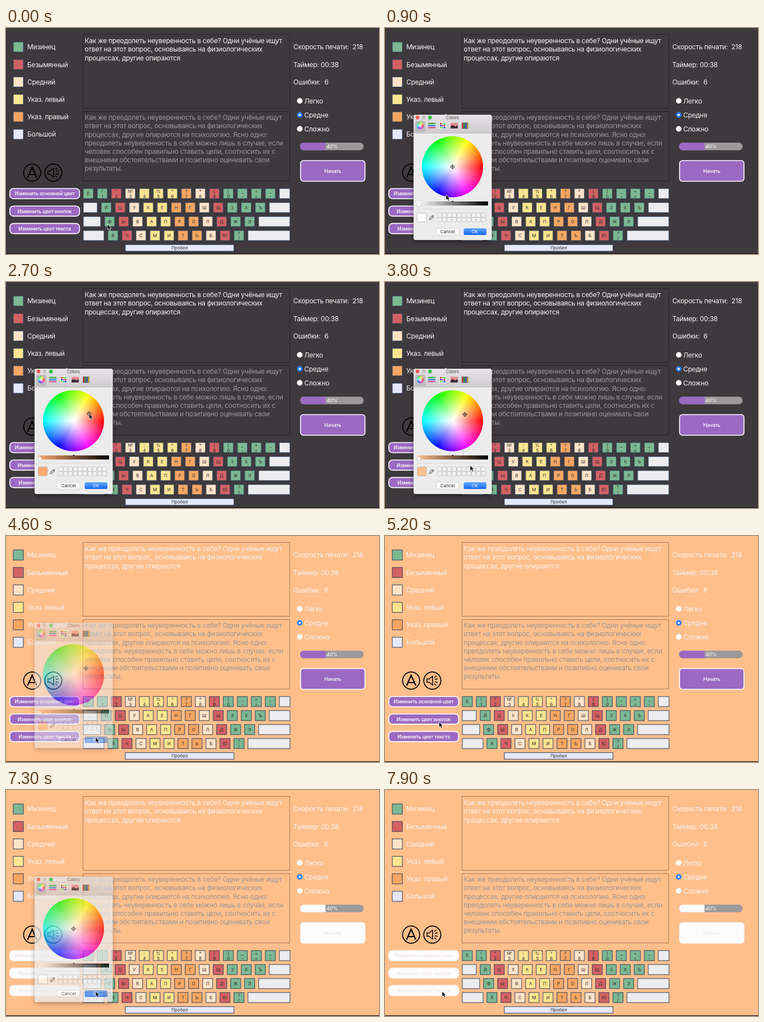
An HTML page that plays this animation: 666 px wide and 404 px high, repeating every 8000 ms.

```html
<!DOCTYPE html>
<html lang="ru">
<head>
<meta charset="utf-8">
<style>
html, body { margin: 0; width: 100%; height: 100%; overflow: hidden; }
svg { display: block; width: 666px; height: 404px; }
text { font: 12px Inter, "Open Sans", sans-serif; letter-spacing: -.28px; fill: #f5f2f3; white-space: pre; }
.mid { text-anchor: middle; }
.dim text { fill: #999799; }
.key { stroke: #2b405c; stroke-width: 1; }
.cap { font-size: 8px; letter-spacing: 0; fill: #2b2b2e; text-anchor: middle; }
.btn rect { fill: var(--accent); stroke: #fff; stroke-width: 1.6; }
.btn text { font-size: 9px; font-weight: 600; text-anchor: middle; }
.white .btn rect { stroke: #f8f1ec; }
.white .btn text { fill: #eee9e7; }
.ui { font-size: 8px; letter-spacing: 0; fill: #222; text-anchor: middle; }
</style>
</head>
<body>
<svg id="stage" viewBox="0 0 666 404"></svg>
<script>
const LOOP = 8000;
const DARK = '#3e393d', PURPLE = '#9b69c2';
const WHEEL = { x: 120.5, y: 248, r: 54.5 };
const COLORS = { G: '#7cb893', R: '#d36163', C: '#ffe4c8', Y: '#fbe590', O: '#f5a662', L: '#e6e8fb', W: '#ededef' };

const rect = (x, y, w, h, fill, extra = '') =>
  `<rect x="${x}" y="${y}" width="${w}" height="${h}" fill="${fill}" ${extra}/>`;
const circle = (x, y, r, fill, extra = '') =>
  `<circle cx="${x}" cy="${y}" r="${r}" fill="${fill}" ${extra}/>`;
const text = (x, y, str, cls = '', extra = '') =>
  `<text x="${x}" y="${y}" class="${cls}" ${extra}>${str}</text>`;
const path = (d, extra) => `<path d="${d}" ${extra}/>`;
const lines = (x, y, list) => list.map((s, i) => text(x, y + i * 15.1, s)).join('');

function legend() {
  const names = ['Мизинец', 'Безымянный', 'Средний', 'Указ. левый', 'Указ. правый', 'Большой'];
  return names.map((name, i) => {
    const y = 25 + i * 31.2;
    return rect(13, y, 18, 18, COLORS['GRCYOL'[i]], 'class="key"') + text(38, y + 13.3, name);
  }).join('');
}

function textBoxes() {
  const frame = 'stroke="#000" stroke-opacity=".35"';
  const start = ['Как же преодолеть неуверенность в себе? Одни учёные ищут',
    'ответ на этот вопрос, основываясь на физиологических'];
  return rect(137.5, 11.5, 369, 132, 'none', frame) + rect(137.5, 149.5, 369, 124, 'none', frame) +
    lines(140.5, 27.3, [...start, 'процессах, другие опираются']) +
    `<g class="dim">${lines(140.5, 164.3, [...start,
      'процессах, другие опираются на психологию. Ясно одно:',
      'преодолеть неуверенность в себе можно лишь в случае, если',
      'человек способен правильно ставить цели, соотносить их с',
      'внешними обстоятельствами и позитивно оценивать свои',
      'результаты.'])}</g>`;
}

function sidePanel() {
  const levels = ['Легко', 'Средне', 'Сложно'].map((name, i) => {
    const y = 130.3 + i * 25, on = i === 1;
    return circle(524.5, y, 5, on ? '#2c82f2' : '#fff') + (on ? circle(524.5, y, 1.9, '#fff') : '') +
      text(532.5, y + 4.5, name);
  }).join('');
  return text(513, 38.3, 'Скорость печати:') + text(618.5, 38.3, '218') +
    text(513, 69.5, 'Таймер: 00:38') + text(513, 100.8, 'Ошибки:') + text(568.5, 100.8, '6') + levels +
    rect(525, 205, 113.5, 13.5, '#9c999b', 'rx="6.5"') +
    path('M531.5 205H570.5V218.5H531.5A6.5 6.75 0 0 1 531.5 205Z', 'fill="var(--accent)"') +
    text(582, 215, '40%', 'mid', 'style="font-size:9px;font-style:italic;font-weight:500"');
}

function buttons() {
  const list = ['основной цвет', 'цвет кнопок', 'цвет текста'].map((name, i) => {
    const y = 287 + i * 31.2;
    return rect(6.8, y, 124.6, 18.2, '', 'rx="6.5"') + text(69, y + 12.4, 'Изменить ' + name);
  }).join('');
  return `<g class="btn">${list}${rect(526, 237, 115, 37, '', 'rx="5"')}${text(583.5, 259, 'Начать')}</g>`;
}

function icons() {
  const ring = 'stroke="#000" stroke-width="1.7"';
  return circle(46.7, 258.5, 15.3, 'none', ring) + circle(84.5, 258.5, 15.3, 'none', ring) +
    path('M38.5 267.5 46.7 249 55 267.5M41.5 262H52', 'fill="none" stroke="#000" stroke-width="2.2"') +
    path('M75 255.5h4l6-5v16l-6-5h-4ZM88 253l4-3M89 256.5l5-1.2M89 260.5l5 1.2M88 264l4 3',
      'fill="none" stroke="#000" stroke-width="1.5"');
}

function keyboard() {
  const rows = [
    [147, 'Ё !1 "2 №3 :4 %5 ^6 ?7 *8 (9 )0 _- += _-', 'GGRCYYYOCRGGGG'],
    [179, 'Й Ц У К Е Н Г Ш Щ З Х Ъ', 'GRCYYOOCRGGG'],
    [185, 'Ф Ы В А П Р О Л Д Ж Э', 'GRCYYOOCRGG'],
    [191, 'Я Ч С М И Т Ь Б Ю ?/', 'GRCYYOOCRG']
  ];
  const key = (x, y, w, color, h = 18) => rect(x, y, w, h, COLORS[color], 'class="key"');
  const all = rows.map(([x0, caps, fingers], r) => {
    const y = 287 + r * 25;
    const list = caps.split(' ');
    const end = x0 + list.length * 25 - 9;
    let out = r ? key(138, y, x0 - 16 - 138, 'W') : '';
    list.forEach((cap, i) => {
      const x = x0 + i * 25;
      out += key(x - 9, y, 18, fingers[i]);
      out += cap.length > 1
        ? text(x, y + 7.6, cap[0], 'cap') + text(x, y + 16.6, cap[1], 'cap')
        : text(x, y + 12, cap, 'cap');
    });
    return out + key(end, y, 507 - end, 'W');
  }).join('');
  return all + key(213, 387.2, 194, 'L', 11.8) + text(310, 396, 'Пробел', 'cap');
}

function wheel() {
  const { x, y, r } = WHEEL;
  const at = deg => `${x + r * Math.cos(deg * Math.PI / 180)} ${y - r * Math.sin(deg * Math.PI / 180)}`;
  let out = '';
  for (let h = 0; h < 360; h += 3)
    out += path(`M${x} ${y}L${at(h - 1.5)}L${at(h + 2.5)}Z`, `fill="hsl(${h},100%,50%)"`);
  return `<g id="wheel">${out}${circle(x, y, r, 'url(#fade)')}</g>`;
}

function toolbar() {
  let out = rect(54, 166, 18, 20, '#bdbbbd', 'rx="2"') +
    '<use href="#wheel" transform="translate(63 174.5) scale(.11) translate(-120.5 -248)"/>';
  ['#49b35a', '#3f8fe0', '#d85a9b'].forEach((c, i) => out += rect(77, 169.5 + i * 3.6, 13, 2.6, c));
  out += rect(97, 168.5, 12, 12, '#fafafa', 'rx="1"');
  for (let i = 0; i < 9; i++)
    out += rect(98.2 + i % 3 * 3.5, 169.7 + (i / 3 | 0) * 3.5, 2.7, 2.7, `hsl(${i * 75},75%,45%)`);
  out += rect(117, 169.5, 13, 10, '#e78a91') + path('M117 179.5v-4l4-2 4 2.5 5-2v5.5Z', 'fill="#3a2a38"');
  ['#d33', '#2a9a44', '#3357d0', '#e5b421'].forEach((c, i) =>
    out += rect(137.3 + i * 3, 169.5, 2.4, 10.5, c, 'stroke="#333" stroke-width=".4"'));
  return out;
}

function dialog() {
  let cells = '';
  for (let i = 0; i < 20; i++)
    cells += rect(93.5 + i % 10 * 8.7, 330.5 + (i / 10 | 0) * 8.4, 7.9, 7.7, '#f1f1f1', 'rx="1" stroke="#bdbdbd" stroke-width=".8"');
  return `<g id="dialog"><g filter="url(#shadow)">${rect(51, 155, 139.5, 224, '#ececec', 'rx="4"')}</g>` +
    path('M51 188V159a4 4 0 0 1 4-4H186.5a4 4 0 0 1 4 4V188Z', 'fill="url(#bar)"') +
    rect(51, 187.5, 139.5, .8, '#b3b1b3') +
    circle(58, 160, 3.4, '#f25e57') + circle(69, 160, 3.4, '#c6c4c6') + circle(80.3, 160, 3.4, '#2fc441') +
    text(120.5, 163, 'Colors', 'ui', 'style="font-size:7.5px;fill:#444"') + toolbar() + wheel() +
    `<g id="cross" fill="none" stroke="#333" stroke-width=".9"><circle r="3"/><path d="M-4.5 0H4.5M0-4.5V4.5"/></g>` +
    rect(57.5, 310, 126.5, 7.3, 'url(#shade)') + path('M119 309h4l-2 2.8Z', 'fill="#333"') +
    path('M60.5 311.5 63.5 315V318.8H57.5V315Z', 'fill="#fff" stroke="#aaa" stroke-width=".5"') +
    rect(57, 323.5, 127.5, .7, '#d2d2d2') +
    rect(57.5, 330.5, 16.5, 16, '#fff', 'id="swatch" rx="2" stroke="#b8b8b8"') +
    path('M79.3 342.5l.8-2.4 4.2-4.2 1.8 1.8-4.2 4.2ZM83.5 335l3.5 3.5M85.5 336.5l1.7-1.7', 'fill="#f8f8f8" stroke="#666" stroke-width="1.1"') +
    cells + rect(91.5, 358, 40.5, 12, '#fff', 'rx="2.5" stroke="#c6c6c6" stroke-width=".7"') +
    text(111.8, 367, 'Cancel', 'ui') + rect(140.5, 358, 40.5, 12, 'url(#ok)', 'rx="2.5"') +
    text(160.5, 367, 'OK', 'ui', 'style="fill:#fff"') + '</g>';
}

const gradient = (id, a, b, dir, first = '') =>
  `<linearGradient id="${id}" ${dir}><stop ${first} stop-color="${a}"/><stop offset="1" stop-color="${b}"/></linearGradient>`;
const down = 'x2="0" y2="1"';
const stage = document.getElementById('stage');
stage.innerHTML = `<defs>
  <radialGradient id="fade"><stop stop-color="#fff"/><stop offset="1" stop-color="#fff" stop-opacity="0"/></radialGradient>
  ${gradient('bar', '#e6e4e6', '#cecccf', down)}${gradient('ok', '#5fa7fa', '#1668f0', down)}
  ${gradient('shade', '#fff', '#000', '', 'id="tone"')}
  <filter id="shadow" x="-20%" y="-20%" width="140%" height="140%"><feDropShadow dx="0" dy="3" stdDeviation="4" flood-opacity=".4"/></filter>
  </defs>` + rect(0, 0, 666, 404, DARK, 'id="back"') + legend() + textBoxes() + sidePanel() +
  icons() + buttons() + keyboard() + rect(0, 402.8, 666, 1.2, '#1a181a') + dialog() +
  path('M0 0V9.6L2.3 7.5 4 11.2 5.8 10.4 4.2 6.8H7.2Z', 'id="cursor" fill="#000" stroke="#fff" stroke-width=".8"');

const el = id => document.getElementById(id);

// Pointer stops: time, x, y
const STOPS = [
  [0, 181, 351], [100, 181, 351], [450, 109, 298], [1300, 109, 298], [2000, 132, 256], [2400, 152, 231],
  [2700, 148.3, 235.5], [3200, 142.5, 236.8], [3600, 142.5, 236.8], [3800, 152, 328], [4200, 160, 360],
  [4700, 160, 360], [5250, 95, 332], [6400, 95, 332], [7000, 160, 360], [7350, 160, 360], [7800, 102, 360], [8000, 102, 360]
];

function pointer(t) {
  const i = STOPS.findIndex(s => s[0] > t);
  const [t0, x0, y0] = STOPS[i - 1], [t1, x1, y1] = STOPS[i];
  const p = (t - t0) / (t1 - t0), e = p * p * (3 - 2 * p);
  return [x0 + (x1 - x0) * e, y0 + (y1 - y0) * e];
}

function pick([x, y]) {
  const dx = x - WHEEL.x, dy = WHEEL.y - y;
  const hue = Math.atan2(dy, dx) * 180 / Math.PI;
  return `hsl(${hue},100%,${100 - 50 * Math.hypot(dx, dy) / WHEEL.r}%)`;
}

const PICK_START = 2100, PICK_END = 3500;
const chosen = pick(pointer(PICK_END));

function opacity(t) {
  const visible = (open, close) => t < open ? 0 : Math.max(0, Math.min(1, (close + 200 - t) / 200));
  return t < 5000 ? visible(500, 4500) : visible(5550, 7250);
}

function draw(now) {
  const t = now % LOOP;
  const tip = pointer(t);
  const picking = t >= PICK_START && t < 5000;
  const spot = picking ? pointer(Math.min(t, PICK_END)) : [WHEEL.x, WHEEL.y];
  const color = picking ? pick(spot) : '#fff';
  const white = t >= 7300;
  el('back').setAttribute('fill', t < 4550 ? DARK : chosen);
  stage.style.setProperty('--accent', white ? '#fdfcfc' : PURPLE);
  stage.classList.toggle('white', white);
  el('dialog').setAttribute('opacity', opacity(t));
  el('cross').setAttribute('transform', `translate(${spot})`);
  el('swatch').setAttribute('fill', color);
  el('tone').setAttribute('stop-color', color);
  el('cursor').setAttribute('transform', `translate(${tip})`);
  requestAnimationFrame(loop);
}

const startTime = performance.now();
const loop = () => draw(performance.now() - startTime);
loop();
</script>
</body>
</html>
```
